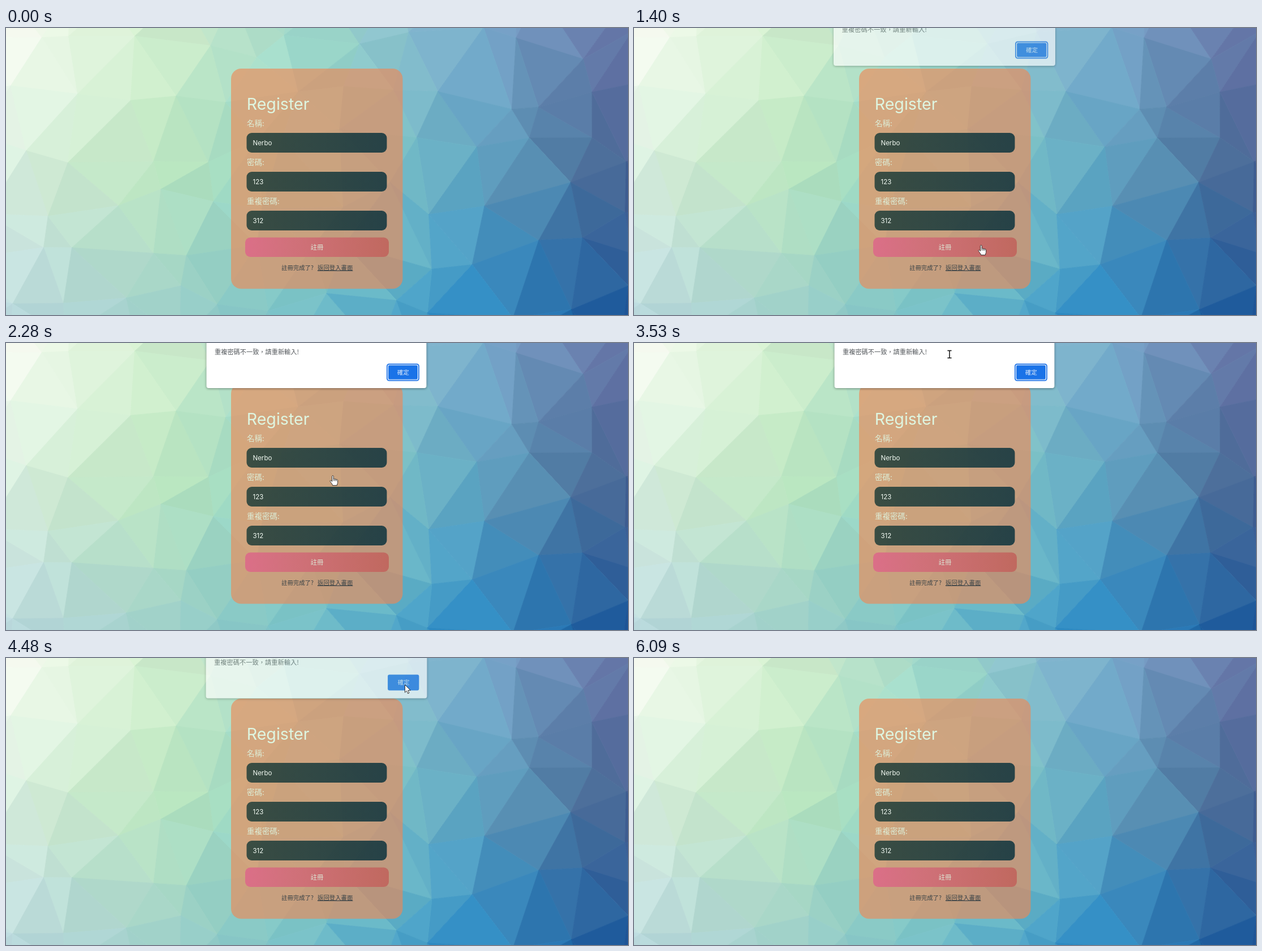
These frames come from a looping animation (1100 by 509 pixels, 6590 ms). An HTML page:

```html
<!DOCTYPE html>
<html lang="zh-Hant">
<head>
<meta charset="utf-8">
<title>Register</title>
<style>
html, body { margin: 0; width: 100%; height: 100%; overflow: hidden; }
svg { display: block; width: 100vw; height: 100vh; }
text { font-family: Inter, "Noto Sans CJK TC", "Noto Sans CJK", sans-serif; fill: #def6e1; }
.zh { font-family: "Noto Sans CJK TC", "Noto Sans CJK", sans-serif; font-weight: 300; fill-opacity: .88; }
.label { font-size: 13.5px; }
.value { font-size: 11.5px; fill: #f2faf3; }
.dark { font-size: 10.4px; fill: #24343e; }
#dialog { filter: drop-shadow(0 1px 2px rgba(0,0,0,.4)); }
</style>
</head>
<body>
<svg viewBox="0 0 1100 509" preserveAspectRatio="none">
  <defs>
    <linearGradient id="field">
      <stop offset="0" stop-color="#153734"/><stop offset="1" stop-color="#002c39"/>
    </linearGradient>
    <linearGradient id="pink">
      <stop offset="0" stop-color="#db6f88"/><stop offset=".3" stop-color="#d1717b"/>
      <stop offset="1" stop-color="#c0695f"/>
    </linearGradient>
  </defs>
  <g id="mesh"></g>
  <rect x="398" y="72" width="303.5" height="390.5" rx="18" fill="rgba(238,136,86,.64)"/>
  <text x="425.7" y="145" font-size="28.6">Register</text>
  <g id="form"></g>
  <rect x="423" y="371.5" width="254" height="34.5" rx="9" fill="url(#pink)"/>
  <text class="zh" x="550" y="392.8" font-size="11.5" text-anchor="middle">註冊</text>
  <text class="zh dark" x="487" y="429">註冊完成了?</text>
  <text class="zh dark" x="551" y="429" text-decoration="underline">返回登入畫面</text>
  <g id="dialog">
    <rect x="354.5" y="-80" width="389" height="160" rx="4" fill="#fff"/>
    <text class="zh" x="369" y="20" font-size="11.2" style="fill:#3c4146">重複密碼不一致，請重新輸入!</text>
    <rect x="674.5" y="38" width="55" height="28" rx="3" fill="#1a73e8"/>
    <g id="ring" fill="none">
      <rect x="674" y="37.5" width="56" height="29" rx="3.5" stroke="#2f7de9" stroke-width="2"/>
      <rect x="675.5" y="39" width="53" height="26" rx="2.5" stroke="#fff" stroke-width="1.2"/>
    </g>
    <text class="zh" x="702.5" y="55.8" font-size="10.4" text-anchor="middle" style="fill:#fff">確定</text>
  </g>
  <g id="cursor">
    <path id="arrow" d="M0 0V13.6L3.1 10.7 5.2 15.5 7.5 14.5 5.4 9.8H9.8Z" fill="#fff" stroke="#222" stroke-width=".9"/>
    <g id="hand" fill="#fff" stroke="#222" stroke-width=".9" stroke-linejoin="round">
      <path d="M-1.4 1.4C-1.4 -.2 1.1 -.2 1.1 1.4V6.3C1.5 5.4 3.5 5.6 3.6 6.9 4.2 6 6 6.3 6.1 7.5 6.8 6.8 8.6 7.1 8.6 8.7V12.5C8.6 14.5 7.5 15 7.3 17.6H-.4C-.6 15.4 -3 13.3 -4.7 10.4 -5.3 9 -3.8 8.2 -2.8 9.2L-1.4 10.7Z"/>
      <path d="M1.1 6.3V9.6M3.6 6.9V9.8M6.1 7.5V10" fill="none"/>
    </g>
    <path id="beam" d="M-3.6 -6.6H3.6M0 -6.6V6.6M-3.6 6.6H3.6" fill="none" stroke="#111" stroke-width="1.5"/>
  </g>
</svg>
<script>
const $ = id => document.getElementById(id);
const clamp = v => Math.max(0, Math.min(1, v));
const mix = (a, b, f) => a + (b - a) * f;

let seed = 7;
const rand = () => (seed = seed * 16807 % 2147483647) / 2147483647;

// Colours from left to right at the top, middle and bottom
const shades = [
  "f9fdf3 d0edcc 9fd9cc 78aacc 6270a3",
  "daefdf bbe6be 86cfc4 61a7c4 486292",
  "bcdade a0d1c9 76c2cb 2e8cc6 195092"
].map(row => row.split(" ").map(h => [0, 2, 4].map(i => parseInt(h.slice(i, i + 2), 16))));

function shade(x, y) {
  const u = clamp(x / 1100) * 3.999, v = clamp(y / 509) * 1.999;
  const i = u | 0, j = v | 0, light = (rand() - .5) * 9;
  const at = (row, k) => mix(shades[row][i][k], shades[row][i + 1][k], u - i);
  return `rgb(${[0, 1, 2].map(k => Math.round(light + mix(at(j, k), at(j + 1, k), v - j)))})`;
}

// Low-poly backdrop: a jittered grid, each cell cut along its shorter diagonal
function mesh(cols, rows, w, h) {
  const grid = Array.from({ length: rows + 1 }, (_, j) => Array.from({ length: cols + 1 }, (_, i) =>
    [(i - 1 + (rand() - .5) * .75 + j % 2 * .4) * w, (j - .7 + (rand() - .5) * .7) * h]));
  const dist = (p, q) => Math.hypot(p[0] - q[0], p[1] - q[1]);
  let out = "";
  for (let j = 0; j < rows; j++) for (let i = 0; i < cols; i++) {
    const a = grid[j][i], b = grid[j][i + 1], c = grid[j + 1][i + 1], d = grid[j + 1][i];
    const halves = dist(a, c) < dist(b, d) ? [[a, b, c], [a, c, d]] : [[a, b, d], [b, c, d]];
    for (const tri of halves) {
      const mid = k => (tri[0][k] + tri[1][k] + tri[2][k]) / 3;
      const fill = shade(mid(0), mid(1));
      out += `<polygon points="${tri.join(" ")}" fill="${fill}" stroke="${fill}" stroke-width=".8"/>`;
    }
  }
  return out;
}
$("mesh").innerHTML = mesh(14, 7, 97, 92);

const fieldY = i => 186 + i * 69;
$("form").innerHTML = [["名稱:", "Nerbo"], ["密碼:", "123"], ["重複密碼:", "312"]].map(([label, value], i) => {
  const y = fieldY(i);
  return `<text class="zh label" x="426" y="${y - 12.5}">${label}</text>
    <rect x="425.5" y="${y}" width="248" height="35" rx="9" fill="url(#field)" fill-opacity=".8"/>
    <text class="value" x="436.5" y="${y + 21.7}">${value}</text>`;
}).join("");

// Motion
const LOOP = 6590, STEP = 63.5, ENTER = 290, LEAVE = 6080, OPEN = 1280, CLICK = 4300, GONE = 4620;
// Cursor moves: from, until, to x, to y
const moves = [
  [290, 890, 654, 400], [960, 1080, 614, 385],
  [1950, 2265, 578, 235], [2265, 2580, 414, 42],
  [2650, 2900, 367, 11], [2900, 3100, 459, 16], [3100, 3290, 405, 9],
  [3340, 3532, 558, 20], [3532, 3980, 692, 31], [4050, 4160, 705.5, 47.5],
  [GONE, 4940, 695, 119], [4990, 5640, 599, 323], [5710, 6090, 988, 500]
];

const progress = (t, a, b) => t >= b ? 1 : clamp(Math.floor((t - a) / STEP) * STEP / (b - a));

function cursorAt(t) {
  let x = 995, y = 492;
  for (const [a, b, toX, toY] of moves) {
    const f = progress(t, a, b);
    x = mix(x, toX, f);
    y = mix(y, toY, f);
  }
  return [x, y];
}

function cursorKind(x, y, modal) {
  const inside = (l, t, r, b) => x > l && x < r && y > t && y < b;
  if (modal) {
    if (y > 80) return "hand";
    return inside(360, 0, 690, 28) ? "beam" : "arrow";
  }
  if (inside(423, 371, 677, 406) || inside(551, 419, 613, 432)) return "hand";
  return [0, 1, 2].some(i => inside(425, fieldY(i), 674, fieldY(i) + 35)) ? "beam" : "arrow";
}

function draw(ms) {
  const t = ms % LOOP + 12;
  const open = progress(t, OPEN, OPEN + 310), shut = progress(t, CLICK + 2 * STEP, GONE);
  const lift = 22 * (1 - open) + 25.5 * shut;
  const s = 1 + lift * .0006;
  $("dialog").setAttribute("transform", `translate(${549 * (1 - s)} ${-lift}) scale(${s} 1)`);
  $("dialog").setAttribute("opacity", (1 - (1 - open) ** 2) * (1 - shut));
  $("ring").setAttribute("opacity", t < CLICK ? 1 : 0);

  const [x, y] = cursorAt(t);
  const kind = cursorKind(x, y, t >= OPEN && t < GONE);
  $("cursor").setAttribute("transform", `translate(${x} ${y})`);
  $("cursor").setAttribute("visibility", t >= ENTER && t < LEAVE ? "visible" : "hidden");
  for (const id of ["arrow", "hand", "beam"]) $(id).setAttribute("display", id === kind ? "inline" : "none");
}

const start = performance.now();
function tick() {
  draw(performance.now() - start);
  requestAnimationFrame(tick);
}
tick();
</script>
</body>
</html>
```
